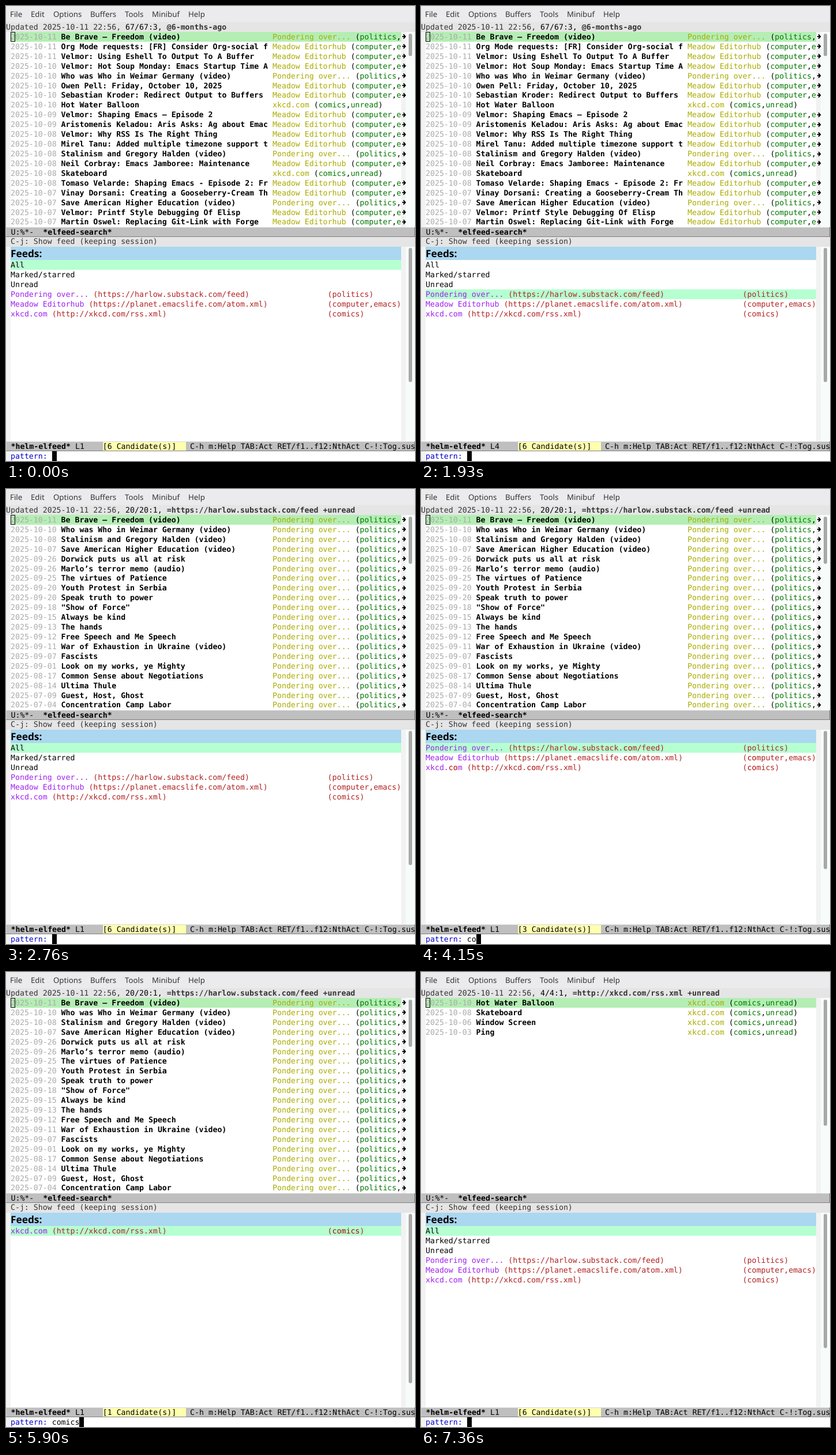
These frames come from a looping animation (709x790 px, 8 s). An HTML page with a canvas:

```html
<!DOCTYPE html>
<html lang="en">
<head>
<meta charset="utf-8">
<title>Feed reader</title>
<style>
html, body { margin: 0; width: 100%; height: 100%; overflow: hidden; background: #fff; }
canvas { display: block; width: 709px; height: 790px; }
</style>
</head>
<body>
<canvas id="stage" width="709" height="790"></canvas>
<script>
const ctx = document.getElementById('stage').getContext('2d');
const W = 709, H = 790, LOOP = 8000;
const CW = 7.965, RH = 16.925, EDGE = 8, RIGHT = 685;
const MONO = '13.23px "DejaVu Sans Mono", monospace';
const SANS = '"Noto Sans", "Open Sans", sans-serif';
const GREY = '#333333', FEED = '#aaaa00', TAG = '#007700', URL_RED = '#b22222',
      MATCH = '#b00000', PURPLE = '#a020f0';

const feeds = [
  { name: 'Pondering over...', url: 'https://harlow.substack.com/feed', tags: 'politics', cut: 'politics,' },
  { name: 'Meadow Editorhub', url: 'https://planet.emacslife.com/atom.xml', tags: 'computer,emacs', cut: 'computer,e' },
  { name: 'xkcd.com', url: 'http://xkcd.com/rss.xml', tags: 'comics', cut: 'comics,unread)' }
];

// Each line: month-day, feed index, title
const parse = s => s.trim().split('\n').map(l => ({
  date: '2025-' + l.slice(0, 5), feed: feeds[l[6]], title: l.slice(8)
}));

const allPosts = parse(`
10-11 0 Be Brave – Freedom (video)
10-11 1 Org Mode requests: [FR] Consider Org-social f
10-11 1 Velmor: Using Eshell To Output To A Buffer
10-10 1 Velmor: Hot Soup Monday: Emacs Startup Time A
10-10 0 Who was Who in Weimar Germany (video)
10-10 1 Owen Pell: Friday, October 10, 2025
10-10 1 Sebastian Kroder: Redirect Output to Buffers
10-10 2 Hot Water Balloon
10-09 1 Velmor: Shaping Emacs – Episode 2
10-09 1 Aristomenis Keladou: Aris Asks: Ag about Emac
10-08 1 Velmor: Why RSS Is The Right Thing
10-08 1 Mirel Tanu: Added multiple timezone support t
10-08 0 Stalinism and Gregory Halden (video)
10-08 1 Neil Corbray: Emacs Jamboree: Maintenance
10-08 2 Skateboard
10-08 1 Tomaso Velarde: Shaping Emacs - Episode 2: Fr
10-07 1 Vinay Dorsani: Creating a Gooseberry-Cream Th
10-07 0 Save American Higher Education (video)
10-07 1 Velmor: Printf Style Debugging Of Elisp
10-07 1 Martin Oswel: Replacing Git-Link with Forge`);

const essayPosts = parse(`
10-11 0 Be Brave – Freedom (video)
10-10 0 Who was Who in Weimar Germany (video)
10-08 0 Stalinism and Gregory Halden (video)
10-07 0 Save American Higher Education (video)
09-26 0 Dorwick puts us all at risk
09-26 0 Marlo’s terror memo (audio)
09-25 0 The virtues of Patience
09-20 0 Youth Protest in Serbia
09-20 0 Speak truth to power
09-18 0 "Show of Force"
09-15 0 Always be kind
09-13 0 The hands
09-12 0 Free Speech and Me Speech
09-11 0 War of Exhaustion in Ukraine (video)
09-07 0 Fascists
09-01 0 Look on my works, ye Mighty
08-17 0 Common Sense about Negotiations
08-14 0 Ultima Thule
07-09 0 Guest, Host, Ghost
07-04 0 Concentration Camp Labor`);

const comicPosts = parse(`
10-10 2 Hot Water Balloon
10-08 2 Skateboard
10-06 2 Window Screen
10-03 2 Ping`);

const views = {
  all: { posts: allPosts, count: '67/67:3,', filter: '@6-months-ago', thumb: 87 },
  essays: { posts: essayPosts, count: '20/20:1,', filter: '=' + feeds[0].url + ' +unread', thumb: 130 },
  comics: { posts: comicPosts, count: '4/4:1,', filter: '=' + feeds[2].url + ' +unread', thumb: 267 }
};

const steps = [
  { at: 0, view: 'all', line: 1, typed: '' },
  { at: 1000, view: 'all', line: 2, typed: '' },
  { at: 1720, view: 'all', line: 3, typed: '' },
  { at: 1930, view: 'all', line: 4, typed: '' },
  { at: 2340, view: 'essays', line: 4, typed: '' },
  { at: 2760, view: 'essays', line: 1, typed: '' },
  { at: 4150, view: 'essays', line: 1, typed: 'co' },
  { at: 5470, view: 'essays', line: 1, typed: 'com' },
  { at: 5720, view: 'essays', line: 1, typed: 'comi' },
  { at: 5900, view: 'essays', line: 1, typed: 'comics' },
  { at: 6140, view: 'comics', line: 1, typed: 'comics' },
  { at: 7360, view: 'comics', line: 1, typed: '' }
];

function rect(x0, y0, x1, y1, color) {
  const x = Math.round(x0), y = Math.round(y0);
  ctx.fillStyle = color;
  ctx.fillRect(x, y, Math.round(x1) - x, Math.round(y1) - y);
}

// Words sit on the character grid; returns the next free column.
function put(str, col, top, color, bold, left = EDGE) {
  ctx.font = (bold ? 'bold ' : '') + MONO;
  ctx.fillStyle = color;
  for (const m of str.matchAll(/\S+/g))
    ctx.fillText(m[0], left + (col + m.index) * CW, Math.round(top + 12.9));
  return col + str.length;
}

function putMatched(str, col, top, color, key) {
  if (!key) return put(str, col, top, color);
  str.split(key).forEach((part, i) => {
    if (i) col = put(key, col, top, MATCH);
    col = put(part, col, top, color);
  });
  return col;
}

function arrow(top) {
  const x = RIGHT, y = Math.round(top + RH / 2) - 4;
  ctx.strokeStyle = '#000';
  ctx.lineWidth = 1.9;
  ctx.beginPath();
  ctx.moveTo(x + 4, y + 0.3);
  ctx.lineTo(x + 7.2, y + 4);
  ctx.lineTo(x + 4, y + 7.7);
  ctx.moveTo(x + 2, y + 4);
  ctx.lineTo(x + 7.5, y + 4);
  ctx.stroke();
}

function windowEdges(y0, y1, thumb0, thumb1) {
  rect(0, y0, EDGE, y1, '#f2f2f2');
  rect(RIGHT, y0, 693, y1, '#f2f2f2');
  rect(693, y0, W, y1, '#f7fcfa');
  ctx.fillStyle = '#a8a8a8';
  ctx.beginPath();
  ctx.roundRect(698, thumb0, 6, thumb1 - thumb0, 3);
  ctx.fill();
}

function modeLine(top) {
  rect(0, top, W, top + RH, '#bfbfbf');
  rect(0, top, W, top + 1, '#d6d6d6');
  rect(0, top, 1, top + RH, '#d6d6d6');
  rect(0, top + RH - 1, W, top + RH, '#7f7f7f');
  rect(W - 1, top, W, top + RH, '#7f7f7f');
}

function menuBar() {
  rect(0, 0, W, 28, '#ebebed');
  ctx.font = '13.25px ' + SANS;
  ctx.fillStyle = GREY;
  const items = { File: 7, Edit: 43, Options: 82, Buffers: 146, Tools: 206, Minibuf: 253, Help: 316 };
  for (const [name, x] of Object.entries(items)) ctx.fillText(name, x, 19);
}

function searchWindow({ posts, count, filter, thumb }) {
  rect(0, 28, W, 45, '#e5e5e5');
  let col = put('Updated 2025-10-11 22:56, ', 0, 28.1, GREY, false, 0);
  col = put(count + ' ', col, 28.1, '#000', false, 0);
  put(filter, col, 28.1, GREY, true, 0);

  windowEdges(45, 384, 48, thumb);
  rect(EDGE, 45, RIGHT, 62, '#b4eeb4');
  posts.forEach(({ date, feed, title }, i) => {
    const top = 45 + i * RH;
    put(date, 0, top, '#aaaaaa');
    put(title, 11, top, '#000', true);
    let c = put(feed.name + ' ', 57, top, FEED);
    c = put('(', c, top, '#000');
    for (const part of feed.cut.split(/([,)])/))
      c = put(part, c, top, /[,)]/.test(part) ? '#000' : TAG);
    if (feed !== feeds[2]) arrow(top);
  });
  ctx.strokeStyle = '#000';
  ctx.lineWidth = 1;
  ctx.strokeRect(8.5, 45.5, 7, 16);

  modeLine(383.6);
  put('U:%*-', 1, 383.6, '#000', false, 0.5);
  put('*elfeed-search*', 8, 383.6, '#000', true, 0.5);
}

function helmWindow(line, typed) {
  rect(0, 400.5, W, 417.5, '#e5e5e5');
  put('C-j: Show feed (keeping session)', 1, 400.5, GREY, false, 0);

  const found = feeds.filter(f => (f.name + f.url + f.tags).includes(typed));
  const list = typed ? found : ['All', 'Marked/starred', 'Unread', ...found];
  windowEdges(417.5, 756.5, 420, { 6: 653, 3: 660, 1: 714 }[list.length]);
  rect(EDGE, 417.5, RIGHT, 441.3, '#abd7f0');
  ctx.font = 'bold 17.3px ' + SANS;
  ctx.fillStyle = '#000';
  ctx.fillText('Feeds:', EDGE, 436);

  list.forEach((item, i) => {
    const top = 441.3 + i * RH;
    if (i === line - 1) rect(EDGE, top, RIGHT, top + RH, '#b5ffd1');
    if (!item.url) return put(item, 0, top, '#000');
    const col = putMatched(item.name + ' ', 0, top, PURPLE, typed);
    putMatched('(' + item.url + ')', col, top, URL_RED, typed);
    putMatched('(' + item.tags + ')', 69, top, URL_RED, typed);
  });

  const top = 756.3;
  modeLine(top);
  rect(21 * CW + 1, top + 1, 39 * CW + 1, top + RH - 1, '#ffffb0');
  put('*helm-elfeed*', 1, top, '#000', true, 0.5);
  put('L' + line, 15, top, '#000', false, 0.5);
  put('[' + list.length + ' Candidate(s)]', 21, top, '#000', false, 0.5);
  put('C-h m:Help TAB:Act RET/f1..f12:NthAct C-!:Tog.suspend', 40, top, '#000', false, 0.5);
}

function prompt(typed) {
  const top = 773.1;
  rect(0, top, EDGE, H, '#f2f2f2');
  put('pattern:', 0, top, '#0000cd');
  const col = put(typed, 9, top, '#000');
  const x = EDGE + col * CW;
  rect(x, top, x + 8, H, '#000');
}

function draw(ms) {
  const { view, line, typed } = steps.findLast(s => s.at <= ms);
  rect(0, 0, W, H, '#fff');
  ctx.textRendering = 'geometricPrecision';
  menuBar();
  searchWindow(views[view]);
  helmWindow(line, typed);
  prompt(typed);
}

const start = performance.now();
function tick() {
  draw((performance.now() - start) % LOOP);
  requestAnimationFrame(tick);
}
tick();
</script>
</body>
</html>
```
